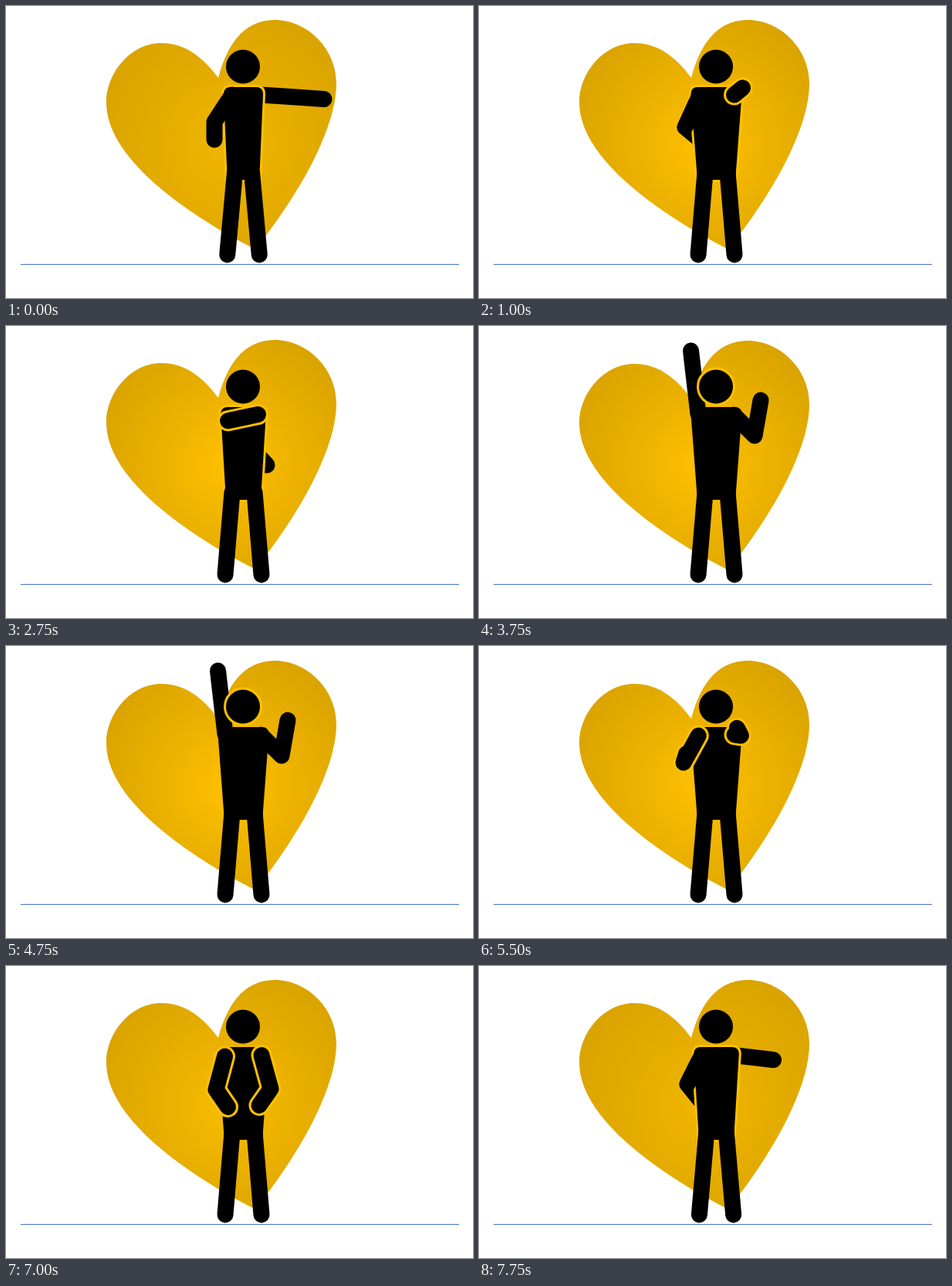
An HTML page with a canvas that plays this animation: 605x378 px, repeating every 8 s.

```html
<!DOCTYPE html>
<html lang="en">
<head>
<meta charset="utf-8">
<title>Dancing figure</title>
<style>
  html, body { margin: 0; width: 100%; height: 100%; overflow: hidden; background: #fff; }
  canvas { display: block; }
</style>
</head>
<body>
<canvas id="stage" width="605" height="378"></canvas>
<script>
const ctx = document.getElementById('stage').getContext('2d');
const LOOP = 8000, STEP = 250, CENTER = 307.5, LIMB = 21;
const heart = new Path2D('M275 93C255 66 232 48 201 48C162 48 130 86 130 125' +
  'C130 193 222 263 323 315C373 253 428 163 428 100C428 55 390 18 348 18C305 18 285 55 275 93Z');

// Arm: layer, then shoulder, elbow and hand.
// behind = under the torso, back = only the forearm is under it,
// plain = joined to the torso, front = outlined on top of it.
const arm = (layer, ...points) => ({ layer, points });
// twist narrows the torso, step brings the legs together.
const pose = (twist, step, left, right) => ({ twist, step, arms: [left, right] });

const point = pose(1, 1,
  arm('plain', [293, 115], [270, 150], [270, 173]),
  arm('behind', [322, 114.6], [365, 117.3], [412, 120.5]));
const turn = pose(.5, .5,
  arm('back', [288.5, 116], [270, 153], [286, 173]),
  arm('behind', [325, 115], [352, 118], [381.5, 121.5]));
const forward = pose(0, 0,
  arm('back', [286, 115.5], [267, 157], [285, 172]),
  arm('front', [330.5, 115], [336, 110.5], [341.5, 106]));
const hug = pose(.5, 0,
  arm('front', [287.5, 122.7], [307, 118.6], [326.5, 114.5]),
  arm('behind', [312, 152], [338, 180], [315, 180]));
const reach = pose(0, 0,
  arm('plain', [284, 114], [279.2, 73], [274.5, 32]),
  arm('plain', [330, 115], [357, 142], [365, 96]));
const hips = pose(0, 0,
  arm('front', [283.5, 117], [272, 160], [287.5, 182.5]),
  arm('front', [331, 115.5], [343, 159], [328, 180.5]));

const mirror = ({ twist, step, arms: [left, right] }) => {
  const flip = a => arm(a.layer, ...a.points.map(([x, y]) => [2 * CENTER - x, y]));
  return pose(twist, step, flip(right), flip(left));
};

const keys = [
  [0, point], [500, point], [1000, forward], [1250, mirror(hug)],
  [1750, mirror(point)], [2250, mirror(point)], [2500, mirror(forward)], [2750, hug],
  [3750, reach], [4250, mirror(reach)], [4750, reach], [5250, mirror(reach)],
  [5750, hips], [7250, hips], [7750, turn], [LOOP, point]
];
const glowKeys = [[0, 0], [1000, 1], [6500, 1], [7750, 0], [LOOP, 0]];

const mix = (a, b, k) => a + (b - a) * k;

function span(list, t) {
  const i = list.findIndex(([time]) => time > t);
  const [t0, from] = list[i - 1], [t1, to] = list[i];
  return { from, to, k: (t - t0) / (t1 - t0) };
}

function poseAt(t) {
  const { from, to, k } = span(keys, t);
  const arms = from.arms.map((a, i) => {
    const b = to.arms[i];
    const points = a.points.map((p, j) => p.map((v, n) => mix(v, b.points[j][n], k)));
    return arm((k < .5 ? a : b).layer, ...points);
  });
  return pose(mix(from.twist, to.twist, k), mix(from.step, to.step, k), ...arms);
}

function line(points, width = LIMB, color = '#000', cap = 'round') {
  ctx.beginPath();
  points.forEach(p => ctx.lineTo(...p));
  ctx.lineCap = cap;
  ctx.lineJoin = 'round';
  ctx.lineWidth = width;
  ctx.strokeStyle = color;
  ctx.stroke();
}

function outline(path, color) {
  ctx.lineWidth = 6;
  ctx.strokeStyle = color;
  ctx.stroke(path);
}

function torsoPath(shoulder, hip, hipY) {
  const path = new Path2D();
  const l = CENTER - shoulder, r = CENTER + shoulder;
  path.moveTo(l + 9, 105);
  path.lineTo(r - 9, 105);
  path.quadraticCurveTo(r, 105, r, 114);
  path.lineTo(CENTER + hip, hipY);
  path.lineTo(CENTER + hip - 1, 225);
  path.lineTo(CENTER - hip + 1, 225);
  path.lineTo(CENTER - hip, hipY);
  path.lineTo(l, 114);
  path.quadraticCurveTo(l, 105, l + 9, 105);
  path.closePath();
  return path;
}

function drawHeart(t, bright) {
  const fill = ctx.createRadialGradient(290, 180, 0, 290, 180, 180);
  fill.addColorStop(0, bright);
  fill.addColorStop(1, '#d9a300');
  ctx.save();
  ctx.translate(0, t >= 3250 && t < 7000 ? 1 : 0);
  ctx.fillStyle = fill;
  ctx.fill(heart);
  ctx.restore();
}

function drawFigure({ twist, step, arms }, edge) {
  const torso = torsoPath(33 - 7.5 * twist, 25 - 3.5 * twist, 220 - 13 * twist);
  const thigh = 14.5 - 3.5 * step, foot = 23.5 - 2.75 * step;
  const on = (...layers) => arms.filter(a => layers.includes(a.layer));
  const hidden = on('behind', 'back');

  hidden.forEach(a => line(a.points));
  if (hidden.length) outline(torso, edge);
  for (const side of [-1, 1]) {
    line([[CENTER + side * thigh, 215], [CENTER + side * foot, 322]]);
  }
  ctx.fillStyle = '#000';
  ctx.fill(torso);
  on('back').forEach(a => line(a.points.slice(0, 2)));
  on('plain').forEach(a => line(a.points));

  const head = new Path2D();
  head.arc(307, 78.5, 22, 0, 2 * Math.PI);
  const raised = arms.some(a => a.points[2][1] < 80);
  if (raised) outline(head, edge);
  ctx.fill(head);

  on('front').forEach(a => {
    line(a.points, LIMB + 6, edge);
    line(a.points);
  });
}

function draw(now) {
  const t = Math.floor(now % LOOP / STEP) * STEP;
  const { from, to, k } = span(glowKeys, t);
  const glow = mix(from, to, k);
  const bright = `rgb(${mix(241, 255, glow)}, ${mix(182, 192, glow)}, 0)`;
  ctx.fillStyle = '#fff';
  ctx.fillRect(0, 0, 605, 378);
  drawHeart(t, bright);
  line([[19, 334.5], [587, 334.5]], 1, '#4472c4', 'butt');
  drawFigure(poseAt(t), '#ffc000');
}

const start = performance.now();
function tick() {
  draw(performance.now() - start);
  requestAnimationFrame(tick);
}
tick();
</script>
</body>
</html>
```
